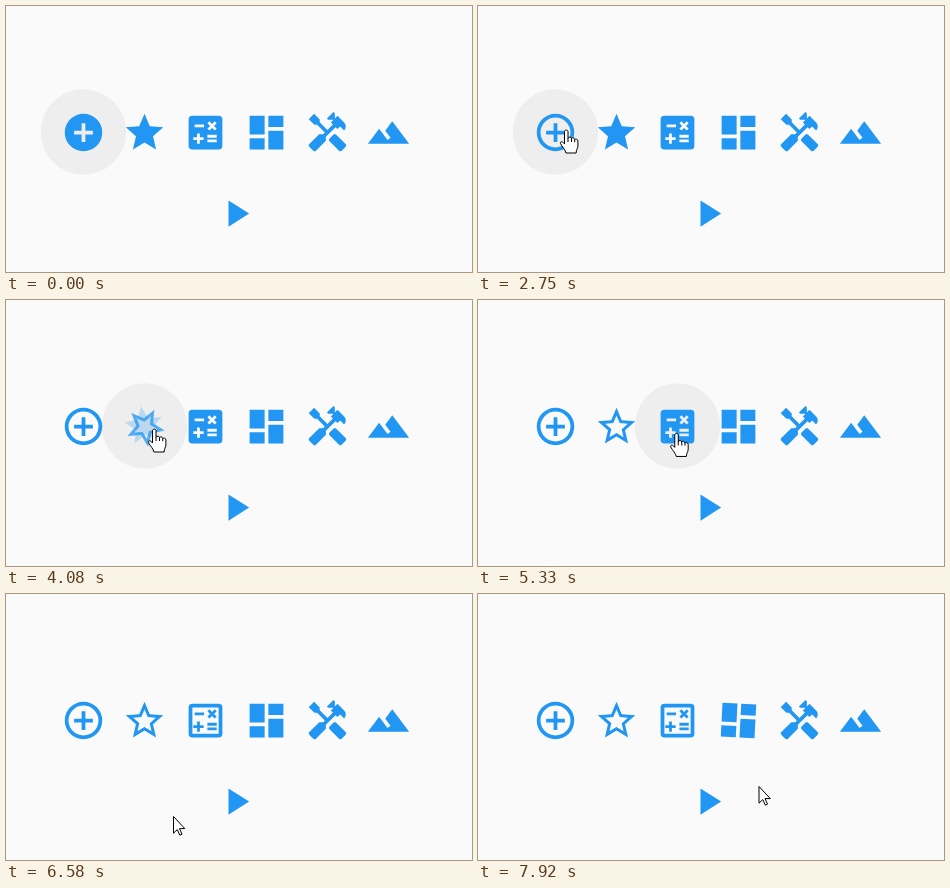
These frames come from a looping animation (466 px wide and 266 px high, 8 s). An HTML page with a canvas:

```html
<!DOCTYPE html>
<html lang="en">
<head>
<meta charset="utf-8">
<title>Animated icons</title>
<style>
html, body { margin: 0; width: 100%; height: 100%; overflow: hidden; background: #fafafa; }
canvas { display: block; width: 466px; height: 266px; }
</style>
</head>
<body>
<canvas id="stage" width="466" height="266"></canvas>
<script>
const ctx = document.getElementById('stage').getContext('2d');
const LOOP = 8000, STEP = 1000 / 12, TURN = 1000;
const BLUE = '#2196f3', SIZE = 45, CELL = 61, ROW = 126.5, LEFT = 77.5;

// Even-odd paths on a 24 unit grid; "inner" turns the solid icon into its outline.
const icons = [
  {
    solid: 'M2 12a10 10 0 1 0 20 0a10 10 0 1 0-20 0z M17 13h-4v4h-2v-4H7v-2h4V7h2v4h4z',
    inner: 'M4 12a8 8 0 1 0 16 0a8 8 0 1 0-16 0z',
    start: 650
  },
  {
    solid: 'M12 17.27L18.18 21l-1.64-7.03L22 9.24l-7.19-.61L12 2 9.19 8.63 2 9.24l5.46 4.73L5.82 21z',
    inner: 'M12 15.4l-3.76 2.27 1-4.28-3.32-2.88 4.38-.38L12 6.1l1.71 4.04 4.38.38-3.32 2.88 1 4.28z',
    start: 3330
  },
  {
    solid: 'M5 3h14a2 2 0 0 1 2 2v14a2 2 0 0 1-2 2H5a2 2 0 0 1-2-2V5a2 2 0 0 1 2-2z' +
      'M6.25 7.72h5v1.5h-5z M13 15.75h5v1.5h-5z M13 13.25h5v1.5h-5z' +
      'M11 16H9v2H7.5v-2h-2v-1.5h2v-2H9v2h2z' +
      'M14.09 10.95l1.41-1.41 1.41 1.41 1.06-1.06-1.41-1.42 1.41-1.41L16.91 6 15.5 7.41 14.09 6l-1.06 1.06 1.41 1.41-1.41 1.42z',
    inner: 'M5 5h14v14H5z',
    start: 5490
  },
  {
    solid: 'M3 3h8v10H3z M3 15h8v6H3z M13 11h8v10h-8z M13 3h8v6h-8z',
    inner: 'M5 5h4v6H5z M5 17h4v2H5z M15 13h4v6h-4z M15 5h4v2h-4z',
    start: 7900
  },
  {
    solid: 'M21.67 18.17l-5.3-5.3h-.99l-2.54 2.54v.99l5.3 5.3c.39.39 1.02.39 1.41 0l2.12-2.12c.39-.38.39-1.02 0-1.41z' +
      'M17.34 10.19l1.41-1.41 2.12 2.12c1.17-1.17 1.17-3.07 0-4.24l-3.54-3.54-1.41 1.41V1.71L15.22 1l-3.54 3.54.71.71h2.83l-1.41 1.41 1.06 1.06-2.89 2.89' +
      'L7.85 6.48V5.06L4.83 2.04 2 4.87l3.03 3.03h1.41l4.13 4.13-.85.85H7.6l-5.3 5.3c-.39.39-.39 1.02 0 1.41l2.12 2.12c.39.39 1.02.39 1.41 0l5.3-5.3v-2.12l5.15-5.15z'
  },
  { solid: 'M14 6l-3.75 5 2.85 3.8-1.6 1.2C9.81 13.75 7 10 7 10l-6 8h22z' }
];
for (const icon of icons) {
  icon.first = new Path2D(icon.solid);
  icon.second = icon.inner && new Path2D(icon.solid + icon.inner);
}
const play = new Path2D('M8 5v14l11-7z');

const hand = new Path2D('M-2 1.6C-2-.4 1.5-.4 1.5 1.6V8.2C2 6.6 4.8 6.8 5 8.6C5.6 7.4 8 7.6 8.2 9.6' +
  'C9 8.6 11.4 9 11.4 11V16C11.4 18.5 9.6 19.5 9.6 23H-.6C-.6 20.5-4.6 16.5-6 13.6C-6.8 11.4-4 10.8-2 14z');
const knuckles = new Path2D('M1.5 8v4M5 8.6v3.4M8.2 9.6v2.6');
const arrow = new Path2D('M.5.5V17.2L4.3 13.6 6.8 19.2 9 18.2 6.5 12.6H11.8z');

// Pointer moves: start time, end time, target x, target y.
const moves = [
  [500, 500, 88.5, 124],
  [2750, 3250, 148.5, 129],
  [5000, 5420, 205, 134],
  [5580, 6000, 167, 222],
  [6600, 7160, 250, 140],
  [7420, 7900, 280.5, 192]
];

const clamp = v => Math.max(0, Math.min(1, v));
const ease = v => v * v * (3 - 2 * v);

function pointerAt(t) {
  let [, , x, y] = moves[0];
  for (const [from, to, tx, ty] of moves.slice(1)) {
    const k = ease(clamp((t - from) / (to - from)));
    x += (tx - x) * k;
    y += (ty - y) * k;
  }
  return { x, y };
}

function drawIcon(path, x, y, angle = 0, alpha = 1) {
  ctx.save();
  ctx.translate(x, y);
  ctx.rotate(angle);
  ctx.scale(SIZE / 24, SIZE / 24);
  ctx.translate(-12, -12);
  ctx.globalAlpha = alpha;
  ctx.fillStyle = BLUE;
  ctx.fill(path, 'evenodd');
  ctx.restore();
}

function drawPointer({ x, y }, overIcon) {
  const shape = overIcon ? hand : arrow;
  ctx.save();
  ctx.translate(x, y);
  ctx.lineWidth = 1;
  ctx.lineJoin = 'round';
  ctx.fillStyle = '#fff';
  ctx.strokeStyle = '#000';
  ctx.fill(shape);
  ctx.stroke(shape);
  if (overIcon) ctx.stroke(knuckles);
  ctx.restore();
}

function draw(t) {
  ctx.fillStyle = '#fafafa';
  ctx.fillRect(0, 0, 466, 266);

  const pointer = pointerAt(t);
  const column = Math.round((pointer.x - LEFT) / CELL);
  const overIcon = Math.abs(pointer.y - ROW) < CELL / 2 && column >= 0 && column < icons.length;
  if (overIcon) {
    ctx.fillStyle = '#eee';
    ctx.beginPath();
    ctx.arc(LEFT + column * CELL, 126, CELL * 0.7, 0, 2 * Math.PI);
    ctx.fill();
  }

  icons.forEach((icon, i) => {
    const x = LEFT + i * CELL;
    const k = icon.second ? clamp((t - icon.start) / TURN) : 0;
    if (k < 1) drawIcon(icon.first, x, ROW, Math.PI * k, 1 - k);
    if (k > 0) drawIcon(icon.second, x, ROW, -Math.PI * (1 - k), k);
  });
  drawIcon(play, 230, 207.5);

  if (t >= moves[0][0]) drawPointer(pointer, overIcon);
}

function tick() {
  const t = performance.now() % LOOP;
  draw(Math.floor((t + 4) / STEP) % (LOOP / STEP) * STEP + 0.01);
  requestAnimationFrame(tick);
}
tick();
</script>
</body>
</html>
```
